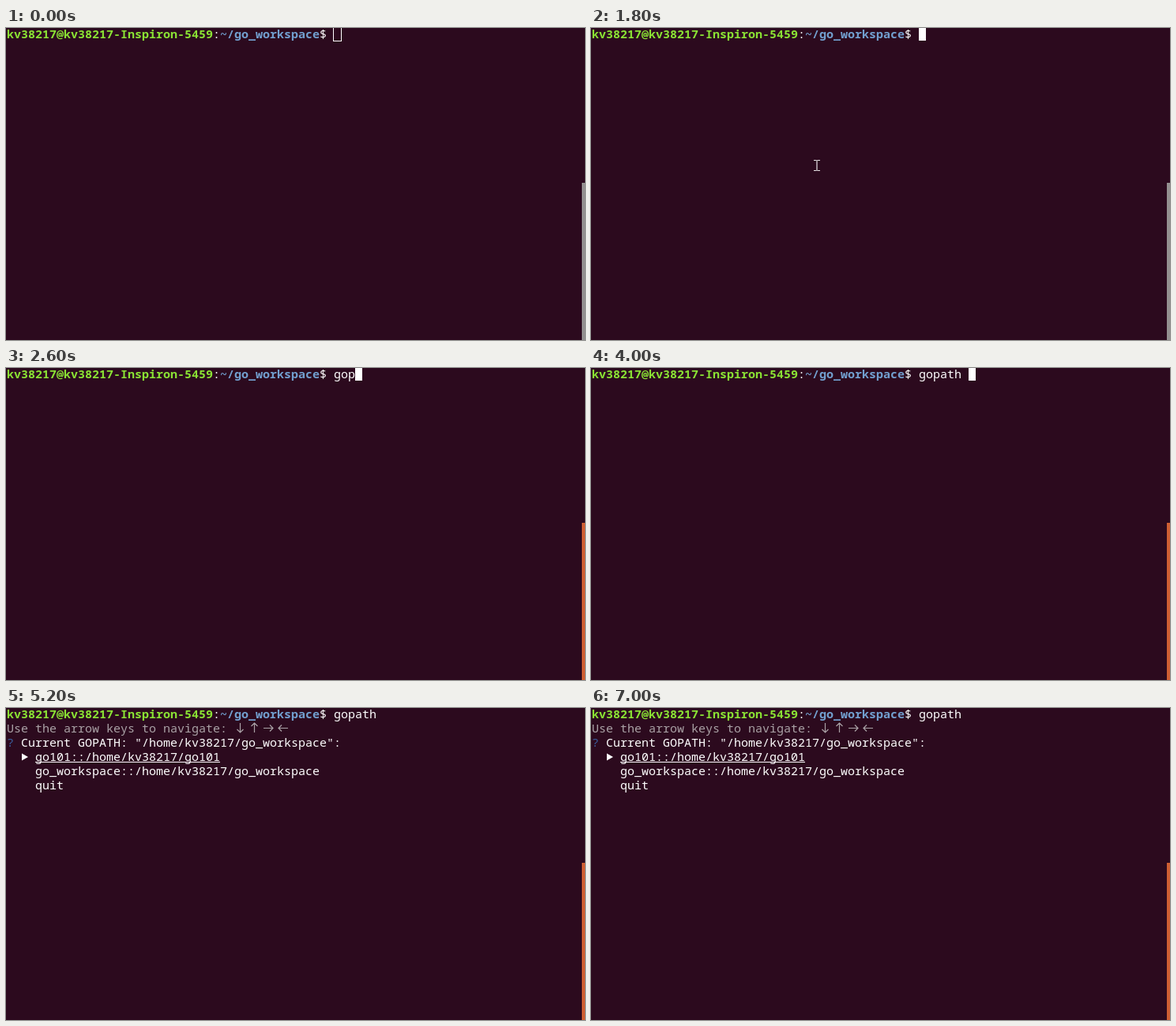
An HTML page that plays this animation: 733 px wide and 395 px high, repeating every 8 s.

```html
<!DOCTYPE html>
<html lang="en">
<head>
<meta charset="utf-8">
<title>Terminal session</title>
<style>
  html, body { margin: 0; width: 100%; height: 100%; overflow: hidden; background: #2c0a1e; }
  svg { display: block; width: 733px; height: 395px; }
  text { font: 15px "Noto Sans Mono", "DejaVu Sans Mono", monospace; fill: #fff; white-space: pre; }
  .bold { font-weight: bold; }
  .dim { fill: #aaa2a6; }
</style>
</head>
<body>
<svg id="stage" viewBox="0 0 733 395">
  <rect width="733" height="395" fill="#2c0a1e"/>
  <rect id="scrollbar" x="729" y="196" width="4" height="199"/>
  <g id="prompt"></g>
  <g id="menu">
    <path fill="none" stroke="#aaa2a6" stroke-width="1.2"
      d="M296.5 19v12m-4-4l4 4l4-4 M314.5 31v-12m-4 4l4-4l4 4 M326 25.5h12m-4-4l4 4l-4 4 M357 25.5h-12m4-4l-4 4l4 4"/>
    <path id="marker" d="M20 75.5v9l8-4.5z" fill="#fff"/>
    <rect id="underline" x="37" height="1" fill="#fff"/>
  </g>
  <rect id="cursor" y="0" width="9" height="16" fill="#fff"/>
  <rect id="hollow" x="414.5" y="-0.5" width="10" height="17" fill="none" stroke="#fff"/>
  <path id="pointer" d="M-4 -6.5h3.5m1 0h3.5M0 -6.5v13M-4 6.5h3.5m1 0h3.5" fill="none" stroke="#e8e4e6" stroke-width="1.2"/>
</svg>
<script>
const CELL = 9, ROW = 18, LOOP = 8000;
const USER = "kv38217", HOME = "/home/" + USER;
const $ = id => document.getElementById(id);

function write(parent, col, row, string, color, className) {
  const node = document.createElementNS("http://www.w3.org/2000/svg", "text");
  node.setAttribute("x", 1 + col * CELL);
  node.setAttribute("y", 13 + row * ROW);
  if (color) node.style.fill = color;
  if (className) node.setAttribute("class", className);
  node.textContent = string;
  $(parent).append(node);
  return node;
}

const options = [`go101::${HOME}/go101`, `go_workspace::${HOME}/go_workspace`, "quit"];

write("prompt", 0, 0, `${USER}@${USER}-Inspiron-5459`, "#8ae234", "bold");
write("prompt", 29, 0, ":");
write("prompt", 30, 0, "~/go_workspace", "#729fcf", "bold");
write("prompt", 44, 0, "$");
const command = write("prompt", 46, 0, "");

write("menu", 0, 1, "Use the arrow keys to navigate:", null, "dim");
write("menu", 0, 2, "?", "#3a5c9c");
write("menu", 2, 2, `Current GOPATH: "${HOME}/go_workspace":`);
options.forEach((option, i) => write("menu", 4, 3 + i, option));

// Each track lists [start time, value]; a value holds until the next start.
const typed = [[0, ""], [2300, "g"], [2500, "go"], [2600, "gop"], [2900, "gopath "]];
const lit = [[0, false], [1800, true], [3400, false], [4000, true], [4600, false], [5100, true], [5200, false]];
const chosen = [[0, 0], [6000, 1], [6200, 2], [6700, 1], [7000, 0]];
const pointerAt = [[0, null], [1400, [136, 208]], [1500, [293, 167]], [1600, [286, 174]], [2200, null]];

const valueAt = (track, t) => track.filter(([start]) => t >= start).pop()[1];
const show = (id, visible) => $(id).setAttribute("visibility", visible ? "visible" : "hidden");

function render(t) {
  const input = valueAt(typed, t);
  command.textContent = input;
  $("cursor").setAttribute("x", 415 + input.length * CELL);
  show("cursor", valueAt(lit, t));
  show("hollow", t < 1800);
  $("scrollbar").setAttribute("fill", t < 1900 ? "#949090" : "#cf5f33");

  const spot = valueAt(pointerAt, t);
  show("pointer", spot);
  if (spot) $("pointer").setAttribute("transform", `translate(${spot})`);

  const index = valueAt(chosen, t);
  show("menu", t >= 5200);
  $("marker").setAttribute("transform", `translate(0 ${(index - 1) * ROW})`);
  $("underline").setAttribute("y", 68 + index * ROW);
  $("underline").setAttribute("width", options[index].length * CELL);
}

function tick() {
  render(performance.now() % LOOP);
  requestAnimationFrame(tick);
}
tick();
</script>
</body>
</html>
```
